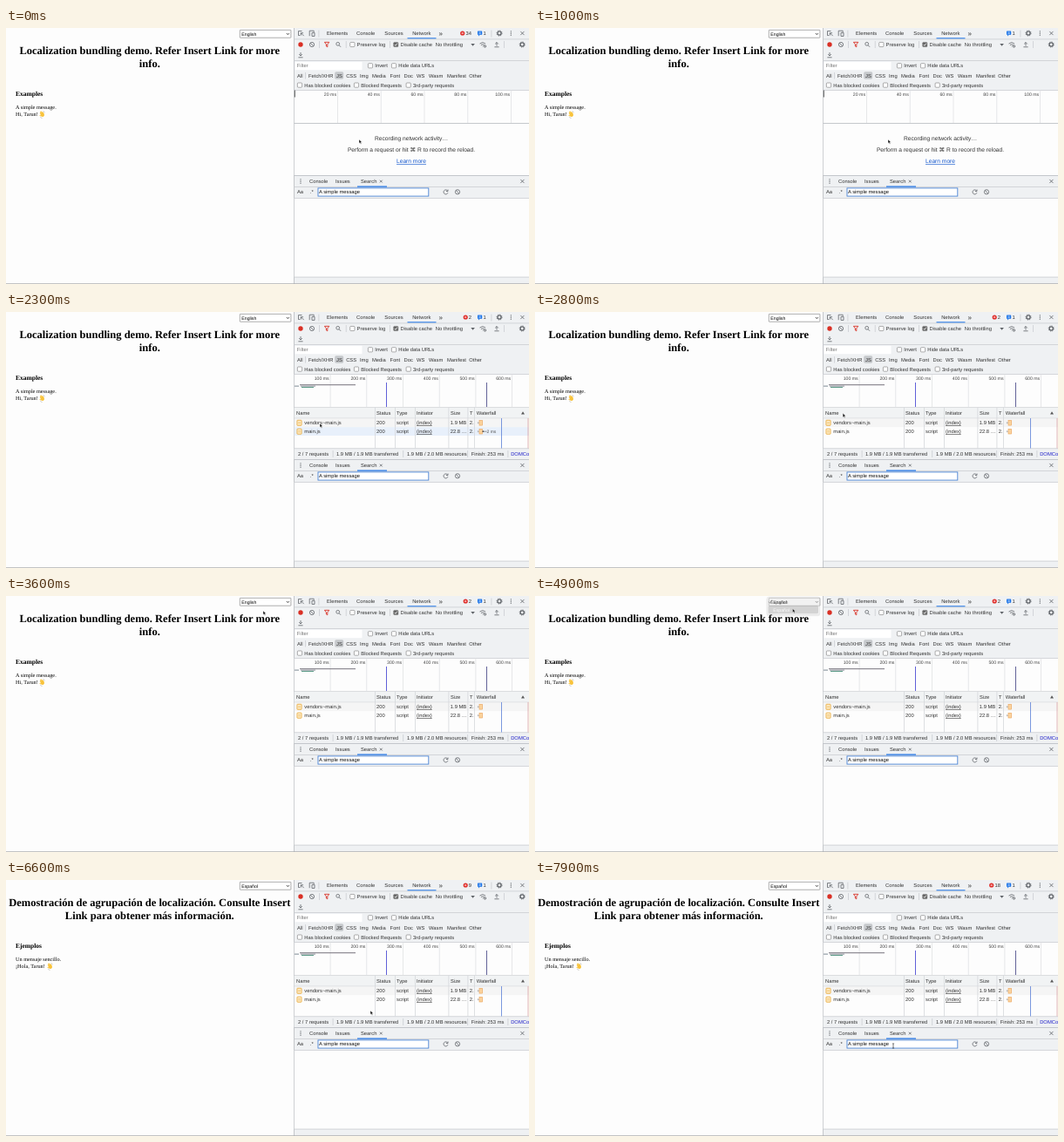
Recreate the animation shown at these times as an HTML page. Size 600 by 294 pixels, loop 8000 ms.

```html
<!DOCTYPE html>
<html lang="en">
<head>
<meta charset="utf-8">
<title>Localization demo</title>
<style>
  html, body { margin: 0; width: 100%; height: 100%; overflow: hidden; background: #fdfdfd; }
  svg { display: block; width: 600px; height: 294px; }
  text { font: 5.8px "Liberation Sans", Arial, sans-serif; fill: #333; text-rendering: geometricPrecision; white-space: pre; }
  .page text { font-family: "Liberation Serif", Times, serif; font-size: 6.25px; fill: #000; }
  .page .h1 { font-size: 12.5px; font-weight: bold; text-anchor: middle; }
  .page .h3 { font-size: 7.5px; font-weight: bold; }
  .pick { font-size: 5.2px; fill: #000; }
  .big { font-size: 6.65px; text-anchor: middle; }
  .tick { font-size: 5.2px; text-anchor: end; fill: #444; }
  .line { fill: none; stroke: #5f6368; stroke-width: .8; }
</style>
</head>
<body>
<svg id="stage" viewBox="0 0 600 294"></svg>
<script>
const NS = 'http://www.w3.org/2000/svg';
const LOOP = 8000;
const stage = document.getElementById('stage');
let parent = stage;

function el(tag, attrs, content) {
  const node = document.createElementNS(NS, tag);
  for (const key in attrs) node.setAttribute(key, attrs[key]);
  if (content !== undefined) node.textContent = content;
  parent.appendChild(node);
  return node;
}
function group(attrs, draw) {
  const outer = parent;
  const g = parent = el('g', attrs);
  draw();
  parent = outer;
  return g;
}
const rect = (x, y, w, h, fill, more) => el('rect', { x, y, width: w, height: h, fill, ...more });
const text = (x, y, str, more) => el('text', { x, y, ...more }, str);
const path = (d, more) => el('path', { d, class: 'line', ...more });
const circle = (cx, cy, r, more) => el('circle', { cx, cy, r, class: 'line', ...more });
const hline = (y, x = 330.5, w = 269.5, c = '#cbced2') => rect(x, y, w, .8, c);
const vline = (x, y, h, c = '#cbced2') => rect(x, y, .8, h, c);
const show = (node, on) => node.setAttribute('visibility', on ? 'visible' : 'hidden');

function checkbox(x, y, label, checked) {
  rect(x - 2.6, y - 2.6, 5.2, 5.2, checked ? '#666' : '#fff', { rx: .9, stroke: '#777', 'stroke-width': .6 });
  if (checked) path(`M${x - 1.5} ${y}l1.1 1.3 2-2.7`, { style: 'stroke:#fff' });
  text(x + 5.3, y + 2, label);
}
function gear(x, y) {
  circle(x, y, 2.1, { style: 'stroke-width:1.3' });
  circle(x, y, 3.1, { 'stroke-dasharray': '1.2 1.23' });
}
function cross(x, y, r) {
  path(`M${x - r} ${y - r}l${2 * r} ${2 * r}m0 ${-2 * r}l${-2 * r} ${2 * r}`);
}
function dots(x, y) {
  for (const d of [-2.2, 0, 2.2]) circle(x, y + d, .65, { style: 'fill:#5f6368;stroke:none' });
}
function banned(x, y) {
  circle(x, y, 2.6);
  path(`M${x - 1.8} ${y - 1.8}l3.6 3.6`);
}
function arrowTray(x, y, up) {
  path(up ? `M${x} ${y + 1.5}v-4m-1.8 1.8l1.8-1.8 1.8 1.8` : `M${x} ${y - 3}v4m-1.8-1.8l1.8 1.8 1.8-1.8`);
  path(`M${x - 2.6} ${y + 2.8}h5.2`);
}

// ---- Web page ----
function wave(x, y) {
  group({ transform: `translate(${x} ${y}) rotate(-28)`, fill: 'none', stroke: '#f8c33c', 'stroke-linecap': 'round' }, () => {
    el('ellipse', { cx: 0, cy: 1, rx: 2, ry: 2, fill: '#f8c33c', stroke: 'none' });
    el('path', { d: 'M-1.4 .5v-2.6M-.4 0v-3.3M.7 0v-3.1M1.6 .6v-2.2M-1.5 1.6l-1.4-1.5', 'stroke-width': .95 });
    el('path', { d: 'M3 -2.3q.6 .8 .4 1.7M-3.4 2.2q.2 1 1 1.5', stroke: '#8a8a8a', 'stroke-width': .4 });
  });
}
function page(lines, heading, message, greeting, waveX) {
  return group({ class: 'page' }, () => {
    text(164.8, 30.2, lines[0], { class: 'h1' });
    text(164.8, 44.7, lines[1], { class: 'h1' });
    text(11, 78, heading, { class: 'h3' });
    text(11, 93, message);
    text(11, 101.2, greeting);
    wave(waveX, 99);
  });
}
rect(0, 0, 600, 294, '#fdfdfd');
const english = page(['Localization bundling demo. Refer Insert Link for more', 'info.'],
  'Examples', 'A simple message.', 'Hi, Tarun!', 41.5);
const spanish = page(['Demostración de agrupación de localización. Consulte Insert', 'Link para obtener más información.'],
  'Ejemplos', 'Un mensaje sencillo.', '¡Hola, Tarun!', 50.5);

rect(268.3, 2.3, 58.6, 8.9, '#fff', { stroke: '#767676', 'stroke-width': .6, rx: .5 });
const picked = text(270.3, 8.6, 'English', { class: 'pick' });
path('M321.8 6l1.5 1.6 1.5-1.6', { style: 'stroke:#222' });

// ---- Developer tools frame ----
rect(330, 0, 270, 294, '#eff1f3');
vline(330, 0, 294, '#b9bcc0');

path('M339.5 3.5h-4v5h1.8m1-2.8l3.4 3.4m-3.4-.6v-2.8h2.8');
path('M348.2 9.2v-6h5v1.6m-2.2 .6h3v4h-3z');
vline(358.5, 2.5, 8);
[[368, 'Elements'], [402, 'Console'], [434.3, 'Sources'], [466.2, 'Network']]
  .forEach(([x, name]) => text(x, 8.2, name));
rect(460.5, 11.3, 33, 1.2, '#1a73e8');
text(496.5, 8.6, '»', { style: 'font-size:8px' });

const errors = group({}, () => {
  circle(0, 6, 2.6, { style: 'fill:#e0302c;stroke:none' });
  path('M-1 5l2 2m0-2l-2 2', { style: 'stroke:#fff;stroke-width:.6' });
});
const errorCount = text(0, 8.1, '', { 'text-anchor': 'end' });
rect(541, 3.4, 5.2, 4.4, '#1a73e8', { rx: .6 });
path('M542 7.6v1.8l1.8-1.8z', { style: 'fill:#1a73e8;stroke:none' });
path('M542.2 5h2.8m-2.8 1.3h2.8', { style: 'stroke:#fff;stroke-width:.5' });
text(547.6, 8.1, '1');
vline(556.5, 2.5, 8);
gear(566, 6); dots(579.3, 6); cross(592.4, 6, 2.1);
hline(12.5);

circle(338, 19, 2.7, { style: 'fill:#d93025;stroke:none' });
banned(351, 19);
vline(359, 15, 8);
path('M365.4 16.3h5.4l-2 2.5v3l-1.4-.8v-2.2z', { style: 'stroke:#d93025;stroke-width:.9' });
circle(380.7, 18.3, 1.9); path('M382.1 19.8l2 2');
vline(389.8, 15, 8);
checkbox(397.3, 19, 'Preserve log');
vline(440, 15, 8);
checkbox(447.3, 19, 'Disable cache', true);
text(492.8, 21, 'No throttling');
path('M533.3 17.9h4.6l-2.3 2.8z', { style: 'fill:#5f6368;stroke:none' });
path('M543.5 18q3.3-2.8 6.6 0m-5.2 1.6q1.9-1.5 3.8 0m-1.9 1.2v.6');
circle(549.5, 21, 1.2, { style: 'stroke-width:.9' });
arrowTray(563, 19, true);
vline(571, 15, 8);
gear(592.2, 19);
arrowTray(338, 31);
hline(37);

rect(331.5, 38.8, 77, 9.4, '#fff');
text(333.8, 45.4, 'Filter', { style: 'fill:#777' });
checkbox(418, 43.3, 'Invert');
checkbox(445, 43.3, 'Hide data URLs');
rect(377.2, 50.3, 10, 8.4, '#c6c9cc', { rx: 1.6 });
vline(343, 51, 7.5);
const kinds = 'All Fetch/XHR JS CSS Img Media Font Doc WS Wasm Manifest Other'.split(' ');
[334, 347, 379, 390.2, 406, 420, 440.6, 456.6, 471, 485, 506, 531.3]
  .forEach((x, i) => text(x, 56.7, kinds[i]));
checkbox(337, 65.6, 'Has blocked cookies');
checkbox(402, 65.6, 'Blocked Requests');
checkbox(461.7, 65.6, '3rd-party requests');

rect(330.8, 71.2, 269.2, 98, '#fdfdfd');
hline(71);
hline(109, 330.5, 269.5, '#b8bcc1');

// ---- Timeline and request list ----
function ticks(first, gap, unit, n) {
  for (let i = 0; i < n; i++) {
    const x = first + i * gap;
    vline(x, 71.5, 37.5, '#e0e2e4');
    text(x - 1, 77.8, `${(i + 1) * unit} ms`, { class: 'tick' });
  }
}
const bar = (x, y, w, c, h = 1) => rect(x, y, w, h, c);

function file(y, name, size) {
  rect(334, y - 3, 5, 6, '#fff6e0', { stroke: '#e8a020', 'stroke-width': .8, rx: .5 });
  path(`M335.2 ${y - .7}h2.6m-2.6 1.6h2.6`, { style: 'stroke:#e8a020;stroke-width:.6' });
  text(342.3, y + 2, name);
  text(425, y + 2, '200');
  text(448, y + 2, 'script');
  text(471, y + 2, '(index)', { 'text-decoration': 'underline' });
  text(509.8, y + 2, size);
  text(531.8, y + 2, '2.');
}
let rowHover;
function requests(total, finish) {
  rect(330.8, 109.5, 269.2, 12.5, '#f1f3f4');
  hline(121.7);
  rect(330.8, 122.4, 269.2, 9.8, '#f5f5f5');
  rowHover = rect(330.8, 132.2, 269.2, 9.8, '#e8f0fb');
  show(rowHover, false);
  [[333, 'Name'], [425, 'Status'], [448, 'Type'], [471, 'Initiator'], [510, 'Size'], [532, 'T'], [539.7, 'Waterfall']]
    .forEach(([x, name]) => text(x, 117.9, name));
  path('M591 117.6l2-3.4 2 3.4z', { style: 'fill:#555;stroke:none' });
  for (const x of [423, 446, 469, 507.5, 529.5, 537]) vline(x, 109.5, 47, '#d5d8db');
  file(127.3, 'vendors~main.js', '1.9 MB');
  file(137.2, 'main.js', '22.8 …');
  rect(330.8, 156.6, 269.2, 13, '#eff1f3');
  hline(156.4);
  text(335, 165, `2 / ${total} requests`);
  text(379, 165, '1.9 MB / 1.9 MB transferred');
  text(460, 165, '1.9 MB / 2.0 MB resources');
  text(533.7, 165, `Finish: ${finish} ms`);
  for (const x of [374.7, 455.3, 529.3]) vline(x, 159, 8);
}

const idle = group({}, () => {
  ticks(380, 49.8, 20, 5);
  rect(330.8, 71.5, 1, 8, '#555');
  text(465, 128.8, 'Recording network activity…', { class: 'big' });
  text(465, 141.8, 'Perform a request or hit ⌘ R to record the reload.', { class: 'big' });
  text(465, 155.4, 'Learn more', { class: 'big', style: 'fill:#1155cc', 'text-decoration': 'underline' });
});

const loading = group({}, () => {
  ticks(380, 49.8, 20, 5);
  bar(331, 84.6, 17, '#7d8a94');
  bar(336, 84.6, 9, '#3f7f86');
  bar(360, 83.2, 240, '#9a96a8');
  bar(360, 84.6, 62, '#8b8f99');
  bar(364, 86, 48, '#a7a3a0');
  bar(394, 86, 16, '#4faa58');
  bar(400, 87.3, 9, '#3c9be0');
  requests(5, 164);
  for (const [y, w] of [[127.3, 10], [137.2, 8.5]]) {
    path(`M546.5 ${y - 1.4}v2.8m0-1.4h4`, { style: 'stroke:#999;stroke-width:.6' });
    rect(550, y - 2.7, w, 5.4, '#fbd5a0', { stroke: '#e9b06a', 'stroke-width': .5 });
    rect(550, y - 2.7, 2.2, 5.4, '#f2b266');
    rect(557, y - 2.7, .8, 5.4, '#e9a055');
  }
});

let hoverLabel;
const loaded = group({}, () => {
  ticks(371.7, 41.7, 100, 6);
  bar(331, 84.6, 5, '#7d8a94');
  bar(337, 83.2, 64, '#77737d');
  bar(338, 84.6, 17, '#8b8f99');
  bar(339, 86, 14, '#5b9a86');
  vline(436.2, 81, 28, '#3a3ad0');
  vline(551, 81, 28, '#3d3d80');
  requests(7, 253);
  vline(575.5, 159, 8);
  text(579.2, 165, 'DOMContentLoaded: 248 ms', { style: 'fill:#1d1dc8' });
  vline(568, 122, 34.5, '#5b7fd6');
  vline(598.6, 122, 34.5, '#d9a0a0');
  for (const y of [127.3, 137.2]) {
    path(`M541.4 ${y - 1}v2m0-1h2`, { style: 'stroke:#999;stroke-width:.6' });
    rect(543, y - 2.8, 3.6, 5.6, '#fbd5a0', { stroke: '#e9a055', 'stroke-width': .6 });
  }
  hoverLabel = group({}, () => {
    path('M546.6 137.2h5', { style: 'stroke:#777;stroke-width:.7' });
    circle(547.4, 137.2, .9, { style: 'fill:#555;stroke:none' });
    text(551.5, 138.9, '2 ms', { style: 'font-size:5px;fill:#555' });
  });
});

// ---- Search drawer ----
hline(169.2, 330.5, 269.5, '#b8bcc1');
dots(338, 176);
text(348, 178, 'Console');
text(378, 178, 'Issues');
text(407, 178, 'Search');
cross(430.3, 176.1, 1.4);
cross(592.4, 176, 2.1);
hline(182);
rect(403, 181.5, 34, 1.2, '#1a73e8');
text(334, 190.4, 'Aa', { 'font-weight': 'bold' });
text(348.8, 190.4, '.*', { 'font-weight': 'bold' });
rect(358, 183.9, 126.8, 9.2, '#fff', { stroke: '#4a83d4', 'stroke-width': .9 });
text(359, 190.3, 'A simple message', { style: 'fill:#111' });
path('M506.6 187a2.5 2.5 0 1 0 .3 2.2m.1-3.7v2h-2');
banned(518, 188.3);
rect(330.8, 195.2, 269.2, 90.6, '#fdfdfd');
hline(195);
hline(285.7);
rect(0, 293.3, 600, .7, '#a9abad');

// ---- Language menu ----
const menu = group({}, () => {
  rect(265.6, 1.8, 61.6, 21.4, '#000', { rx: 2.6, opacity: .12 });
  rect(266, 1, 60.6, 20.6, '#e6e6e6', { rx: 2.2, stroke: '#bdbdbd', 'stroke-width': .4 });
  path('M268.3 6.6l1.3 1.7 2.3-3.8', { style: 'stroke:#222' });
  text(273.3, 8.6, 'English', { class: 'pick' });
});
const highlight = group({}, () => {
  rect(267.6, 11.2, 57.4, 9, '#a9a9a9', { rx: 1.4 });
  text(273.3, 17.6, 'Español', { class: 'pick', style: 'fill:#fff' });
});
menu.appendChild(highlight);
const plainItem = text(273.3, 17.6, 'Español', { class: 'pick' });
menu.insertBefore(plainItem, highlight);

// ---- Pointer ----
const arrow = el('path', { d: 'M0 0v4.6l1.1-1 .8 1.7 .8-.4-.8-1.6h1.5z', fill: '#111', stroke: '#fff', 'stroke-width': .4 });
const beam = el('path', { d: 'M-1.1-2.8q1.1 0 1.1.7v4.2q0 .7-1.1 .7m2.2-5.6q-1.1 0-1.1.7m0 4.2q0 .7 1.1 .7', fill: 'none', stroke: '#222', 'stroke-width': .6 });

const route = [
  [0, 405, 128], [1500, 405, 128], [2100, 360, 128], [2650, 360, 128],
  [3400, 295, 17], [3700, 295, 17], [4000, 295, 7], [4200, 295, 7], [4500, 295.5, 14.5],
  [5200, 295.5, 14.5], [5800, 318, 40], [6600, 418, 150], [7100, 415, 198], [7500, 411, 190.5], [LOOP, 411, 190.5]
];
function pointer(t) {
  const i = Math.max(1, route.findIndex(p => p[0] > t));
  const [t0, x0, y0] = route[i - 1], [t1, x1, y1] = route[i];
  const p = (t - t0) / (t1 - t0), k = p * p * (3 - 2 * p);
  return [x0 + (x1 - x0) * k, y0 + (y1 - y0) * k];
}
function errorTotal(t) {
  if (t < 1000) return 34;
  if (t < 1700) return 0;
  if (t < 5000) return 2;
  return 4 + Math.max(0, Math.floor((t - 5700) / 157));
}

function render(t) {
  const isSpanish = t >= 5000;
  show(english, !isSpanish);
  show(spanish, isSpanish);
  picked.textContent = t >= 4800 ? 'Español' : 'English';

  show(idle, t < 1100);
  show(loading, t >= 1100 && t < 1700);
  show(loaded, t >= 1700);
  const hover = t >= 2100 && t < 2700;
  show(rowHover, hover);
  show(hoverLabel, hover);

  const count = errorTotal(t);
  show(errors, count > 0);
  errorCount.textContent = count || '';
  errorCount.setAttribute('x', 534);
  errors.setAttribute('transform', `translate(${count > 9 ? 523.7 : 527.2} 0)`);

  const fade = t < 4150 ? 0 : Math.min(1, Math.max(0, (5000 - t) / 200));
  menu.setAttribute('opacity', fade);
  highlight.setAttribute('opacity', t >= 4350 ? 1 : 0);

  const [x, y] = pointer(t);
  const visible = t < 5200 || t >= 5800;
  const inField = x > 358 && x < 485 && y > 183.5 && y < 193.5;
  show(arrow, visible && !inField);
  show(beam, visible && inField);
  for (const c of [arrow, beam]) c.setAttribute('transform', `translate(${x} ${y})`);
}
function loop() {
  render(performance.now() % LOOP);
  requestAnimationFrame(loop);
}
loop();
</script>
</body>
</html>
```
